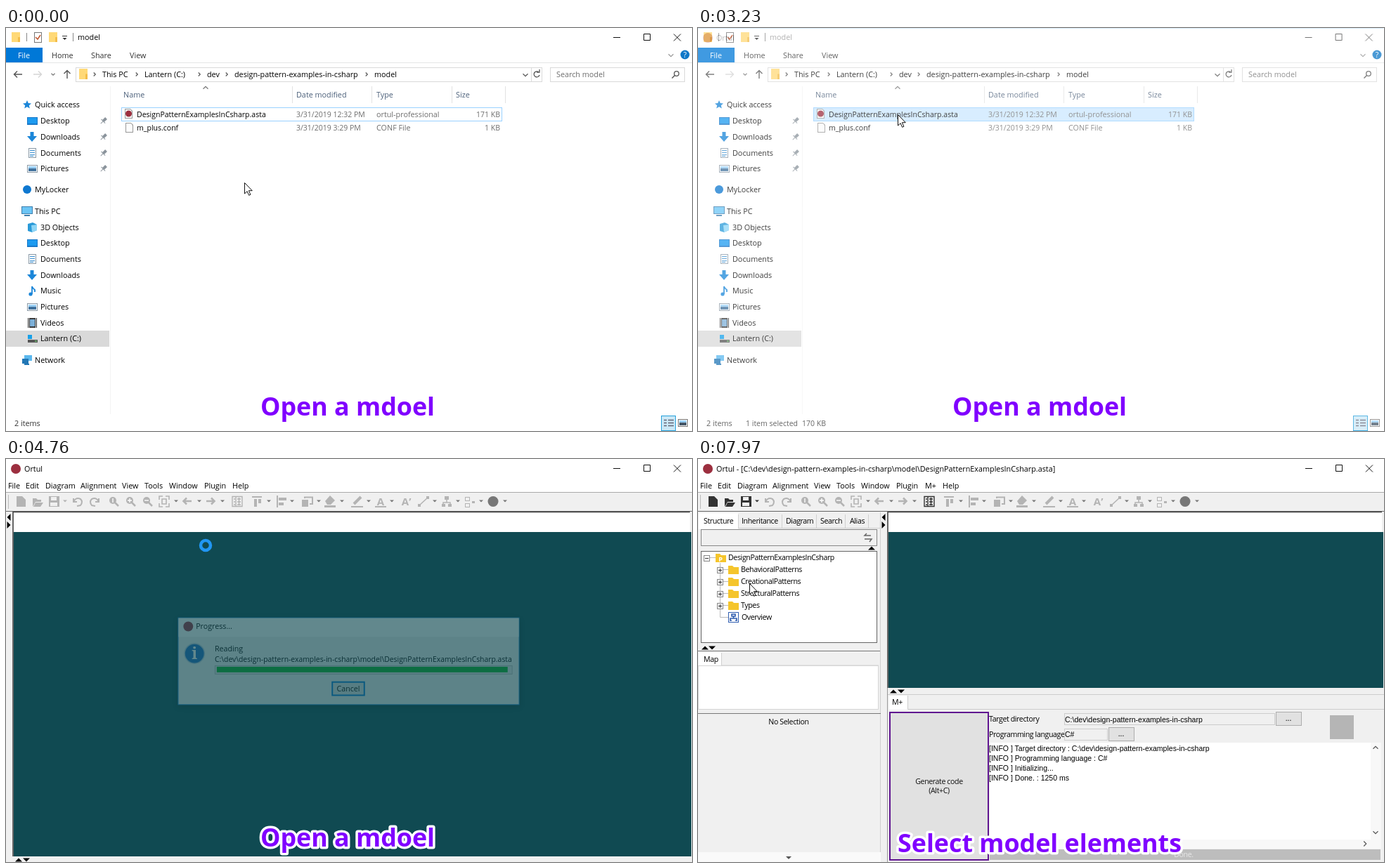
Animation, 976 px wide and 574 px high, one loop 8000 ms. Source, as an HTML page:

```html
<!DOCTYPE html>
<html lang="en">
<head>
<meta charset="utf-8">
<title>Open a model</title>
<style>
html, body { margin: 0; width: 100%; height: 100%; overflow: hidden; background: #fff; }
svg { display: block; width: 976px; height: 574px; }
text { font: 10.8px "Open Sans", "Noto Sans", sans-serif; white-space: pre; }
.tight { font-size: 10.5px; }
.tree { font-size: 10.6px; letter-spacing: -.38px; }
.log { font: 10.53px "Liberation Sans", Arial, sans-serif; }
.cap { font: bold 35.8px "Open Sans", "Noto Sans", sans-serif; fill: #8000ff; stroke: #fff;
  stroke-width: 7px; stroke-linejoin: round; paint-order: stroke; }
#dialog { transform-origin: 487px 288px; filter: drop-shadow(0 3px 5px rgba(0,0,0,.3)); }
#app { transform-origin: 0 0; }
</style>
</head>
<body>
<svg id="stage" viewBox="0 0 976 574"></svg>
<script>
const LOOP = 8000, TEAL = '#104a52', PANEL = '#f0f0f0', BLUE = '#1b86d8', MARK = '#9c2f3f';
const FILE = 'DesignPatternExamplesInCsharp', DIR = 'C:\\dev\\design-pattern-examples-in-csharp';
const PATH = `${DIR}\\model\\${FILE}.asta`, APP = 'Ortul', DRIVE = 'Lantern (C:)';

// Drawing helpers; text is placed by its visual middle.
const text = (x, cy, s, fill = '#000', cls = '', anchor = 'start', id = '') =>
  `<text x="${x}" y="${cy + 4}" fill="${fill}" class="${cls}" text-anchor="${anchor}" ${id && `id="${id}"`}>${s}</text>`;
const rect = (x, y, w, h, fill, stroke = 'none', sw = 1) =>
  `<rect x="${x}" y="${y}" width="${w}" height="${h}" fill="${fill}" stroke="${stroke}" stroke-width="${sw}"/>`;
const box = (x, y, w, h, fill, stroke) => rect(x + .5, y + .5, w - 1, h - 1, fill, stroke);
const line = (d, stroke, sw = 1) => `<path d="${d}" fill="none" stroke="${stroke}" stroke-width="${sw}"/>`;
const shape = (d, fill) => `<path d="${d}" fill="${fill}"/>`;
const dot = (x, y, r, fill) => `<circle cx="${x}" cy="${y}" r="${r}" fill="${fill}"/>`;
const group = (id, s) => `<g id="${id}">${s}</g>`;
const at = (x, y, s) => `<g transform="translate(${x} ${y})">${s}</g>`;
const turn = { r: 0, d: 90, l: 180, u: 270 };
const chev = (x, y, dir, c = '#666', s = 3) =>
  `<path d="M${-s / 2} ${-s}L${s / 2} 0L${-s / 2} ${s}" transform="translate(${x} ${y}) rotate(${turn[dir]})" fill="none" stroke="${c}" stroke-width="1.2"/>`;
const tri = (x, y, dir, s = 5, c = '#000') =>
  `<path d="M${-s / 2} ${-s}L${s / 2} 0L${-s / 2} ${s}z" transform="translate(${x} ${y}) rotate(${turn[dir]})" fill="${c}"/>`;
const arrow = (x, y, dir, c, sw = 1.4) =>
  `<path d="M-6 0H5M1 -4.5L5.5 0L1 4.5" transform="translate(${x} ${y}) rotate(${turn[dir]})" fill="none" stroke="${c}" stroke-width="${sw}"/>`;
const folder = (x, y, w = 12, h = 14) => rect(x, y, w, h, '#ffd977') + rect(x + w - 3, y + h / 2, 3, h / 2, '#f3bd4a');
const winButtons = id => `<g id="${id}" stroke="#111" fill="none"><path d="M864 13.5H874M907.5 8.5H916.5V17.5H907.5zM950 8.5L960 18.5M960 8.5L950 18.5"/></g>`;

// Small icons centred on the origin.
const icons = {
  star: shape('M0 -6L1.8 -2 6 -1.6 2.8 1.2 3.8 5.6 0 3.2 -3.8 5.6 -2.8 1.2 -6 -1.6 -1.8 -2z', BLUE),
  screen: rect(-7, -5, 15, 11, '#1a78c8') + rect(-6, -4, 13, 8, '#1d9bf0'),
  down: shape('M-2.5 -7H2.5V-1H7L0 7L-7 -1H-2.5z', BLUE),
  doc: box(-5, -7, 11, 14, '#fff', '#8a99a6') + line('M-3 -3.5H4M-3 -.5H4M-3 2.5H4M-3 4.5H2', '#3b8fd0'),
  picture: box(-7, -5, 15, 11, '#fff', '#8a99a6') + rect(-5, -3, 11, 3, '#9ad0f5') + rect(-5, 0, 11, 4, '#41719c'),
  cloud: dot(0, 0, 6, '#0f78d0'),
  pc: rect(-8, -7, 16, 11, '#3e7fae') + rect(-7, -6, 14, 9, '#6cc5f5') + rect(-4, 5, 8, 2, '#3e7fae'),
  cube: shape('M-6 -5L1 -7 7 -4V4L0 7 -6 5z', '#2a9ad8') + shape('M-1 -3L7 -4V4L0 7z', '#8fd6f6'),
  note: line('M0 5V-6Q1 -3 4 -1V2', BLUE, 1.8) + dot(-2, 5, 2.6, BLUE),
  film: rect(-6, -7, 13, 14, '#3c3c3c') + rect(-3, -5, 7, 10, '#7db0d8') + line('M-4.5 -7V7M5.5 -7V7', '#ddd'),
  drive: rect(-6, 2, 14, 4, '#555') + rect(-6, -5, 6, 6, '#18a0e8') + rect(4, 3.5, 3, 1, '#7df07d'),
  net: rect(-4, -7, 11, 8, '#5cb8ee') + rect(-7, -2, 9, 7, '#2277b5') + rect(-4, 5, 7, 2, '#2277b5')
};
const side = [
  [30, 109, 'star', 'Quick access'], [37, 132, 'screen', 'Desktop', 1], [37, 155, 'down', 'Downloads', 1],
  [37, 178, 'doc', 'Documents', 1], [37, 200, 'picture', 'Pictures', 1], [30, 230, 'cloud', 'MyLocker'],
  [30, 261, 'pc', 'This PC'], [37, 284, 'cube', '3D Objects'], [37, 306, 'screen', 'Desktop'],
  [37, 329, 'doc', 'Documents'], [37, 352, 'down', 'Downloads'], [37, 374, 'note', 'Music'],
  [37, 397, 'picture', 'Pictures'], [37, 420, 'film', 'Videos'], [37, 442, 'drive', DRIVE], [30, 473, 'net', 'Network']
];

function explorer() {
  const pin = y => `<g transform="translate(139 ${y}) rotate(45)">${rect(-2, -5, 4, 6, '#8b949c') + line('M-4 1H4M0 1V6', '#8b949c')}</g>`;
  const file = (y, name, date, type, size) => text(186, y, name, '#000', 'tight') +
    text(413, y, date, '#6d6d6d', 'tight') + text(527, y, type, '#6d6d6d') + text(703, y, size, '#6d6d6d', 'tight', 'end');
  const page = (x, y) => shape(`M${x} ${y}h8l3 3v11h-11z`, '#999') + shape(`M${x + 1} ${y + 1}h7l2 3v9h-9z`, '#fcfcfc');
  return rect(0, 0, 976, 574, '#fff') +
    folder(8, 6) + folder(61, 6) + line('M29.5 7V19M95.5 7V19', '#888') + box(40, 6, 11, 15, '#fff', '#777') +
    line('M42 13L45 16L49 10', '#c0562f', 1.5) + line('M80 11.5H87', '#333') + tri(83.5, 15.5, 'd', 3, '#333') +
    text(102, 13, 'model', '#000', '', 'start', 'exTitle') + winButtons('exButtons') +
    rect(0, 28, 52, 21, '#0078d7') + text(17, 39, 'File', '#fff') + text(65, 39, 'Home', '#333') +
    text(121, 39, 'Share', '#333') + text(176, 39, 'View', '#333') + line('M0 49.5H976', '#e4e5e6') +
    chev(946, 39, 'd', '#999', 3.5) + dot(966, 38, 6.5, '#0f78c8') + text(966, 38, '?', '#fff', '', 'middle') +
    arrow(17, 66, 'l', '#555') + arrow(45, 66, 'r', '#d5d5d5') + chev(67, 66, 'd', '#777', 2.5) + arrow(87, 66, 'u', '#555') +
    box(99, 56, 664, 21, '#fff', '#d9d9d9') + folder(104, 58, 12, 15) + line('M747.5 57V76', '#d9d9d9') +
    [126, 186, 275, 314, 513].map(x => chev(x, 66, 'r', '#555', 2.5)).join('') +
    [[137, 'This PC'], [197, DRIVE], [286, 'dev'], [325, 'design-pattern-examples-in-csharp'], [524, 'model']]
      .map(([x, s]) => text(x, 66, s)).join('') +
    chev(739, 67, 'd', '#555', 3.5) + line('M758 63A4 4 0 1 0 759 67M755 63H759V59', '#555', 1.3) +
    box(774, 56, 192, 21, '#fff', '#d9d9d9') + text(783, 66, 'Search model', '#6d6d6d') +
    `<circle cx="954" cy="65" r="3.3" fill="none" stroke="#555" stroke-width="1.3"/>` + line('M951.5 67.5L947.5 71.5', '#555', 1.5) +
    rect(0, 431, 147, 23, '#d9d9d9') + line('M148.5 83V550', '#f4f4f4') +
    side.map(([x, y, icon, s, pinned]) => at(x, y, icons[icon]) + text(x < 35 ? 41 : 49, y, s) + (pinned ? pin(y) : '')).join('') +
    [[167, 'Name'], [413, 'Date modified'], [527, 'Type'], [640, 'Size']].map(([x, s]) => text(x, 95, s, '#4c607a')).join('') +
    line('M407.5 83V107M520.5 83V107M634.5 83V107M710.5 83V107', '#e2e2e2') + chev(284, 85, 'u', '#777', 3.5) +
    `<rect id="row" x="164.5" y="113.5" width="541" height="19" stroke="#99d1ff"/>` +
    page(169, 115) + dot(174.5, 122, 4.5, MARK) + page(170, 135) +
    file(123, FILE + '.asta', '3/31/2019 12:32 PM', 'ortul-professional', '171 KB') +
    file(142, 'm_plus.conf', '3/31/2019 3:29 PM', 'CONF File', '1 KB') +
    text(12, 563, '2 items', '#333') + group('picked', text(68, 563, '1 item selected', '#333', 'tight') + text(148, 563, '170 KB', '#333', 'tight')) +
    box(932, 552, 21, 22, '#cbe8f6', '#26a0da') +
    line('M936 558.5H940M936 562.5H940M936 566.5H940M942 558.5H950M942 562.5H950M942 566.5H950', '#667', 1.4) +
    box(956, 557, 14, 11, '#fff', '#777') + rect(958, 559, 10, 3, '#9ad0f5') + rect(958, 562, 10, 4, '#456') +
    group('tip', box(290, 155, 186, 36, '#fff', '#999') + text(295, 165, 'Size: 170 KB', '#575757', 'tight') +
      text(295, 180, 'Date modified: 3/31/2019 12:32 PM', '#575757', 'tight'));
}

function toolbar() {
  const g = '#b4b4b4', lens = (x, s) => dot(x - 1, 59, 5, g) + line(`M${x + 2} 62L${x + 7} 67`, g, 2.5) + line(s, '#fff', 1.4);
  const big = (x, s) => `<text x="${x}" y="66" text-anchor="middle" fill="${g}" style="font-size:15px;font-weight:bold">${s}</text>`;
  return rect(0, 47, 976, 527, PANEL) + line('M0 47.5H976', '#aaa') + line('M3.5 51V71', '#bbb') +
    `<g class="live">${shape('M15 53H23L28 58V68H15z', 'currentColor')}${shape('M38 56H43L45 58H50V61H42L38 68zM42 62H53L49 68H39z', 'currentColor')}
      ${shape('M61 53H76V68H61z', 'currentColor')}${rect(64, 54, 8, 5, PANEL)}${rect(63, 62, 10, 5, PANEL)}</g>` +
    line('M96 56V61H101M96.5 60Q100 54 106 57Q110 61 106 66L101 67M132 56V61H127M131.5 60Q128 54 122 57Q118 61 122 66L127 67', g, 2) +
    lens(153, 'M152 56V62') + lens(177, 'M173 59H179M176 56V62') + lens(201, 'M197 59H203') +
    line('M218 58V53H223M227 53H232V58M232 63V68H227M223 68H218V63M222 57H228V64H222z', g, 1.6) +
    arrow(258, 60, 'l', g, 2.6) + arrow(291, 60, 'r', g, 2.6) +
    `<g class="live">${line('M322 53.5H336V67.5H322zM327 53V68M324 57H326M324 61H326M324 65H326M329 57H334M329 61H334M329 65H334M331.5 55V66', 'currentColor', 1.4)}</g>` +
    line('M350 54H364', g, 2) + rect(353, 57, 4, 11, g) + rect(359, 57, 4, 6, g) +
    line('M386 52V69', g, 2) + rect(388, 55, 11, 4, g) + rect(388, 62, 7, 4, g) +
    rect(421, 58, 9, 10, g) + line('M425 56V54.5H436V64H432', g, 2) +
    shape('M454 60L461 52L468 59L462 65H457z', g) + rect(453, 66, 16, 3, g) +
    line('M495 64L505 54', g, 4) + rect(491, 67, 17, 2, g) + big(533, 'A') + rect(525, 67, 16, 2, g) + big(568, 'A') + big(575, '’') +
    line('M588 66L600 55', g, 1.6) + rect(586, 64, 4, 4, g) + rect(598, 53, 4, 4, g) +
    rect(624, 53, 6, 5, g) + line('M627 58V62M622 66V62H632V66', g, 1.5) + rect(620, 64, 5, 4, g) + rect(629, 64, 5, 4, g) +
    box(653, 54, 7, 6, PANEL, g) + box(653, 63, 7, 6, PANEL, g) + rect(663, 60, 4, 3, g) + dot(693, 60.5, 7.5, '#777') +
    `<g class="live">${tri(84, 60, 'd', 3, 'currentColor')}</g>` +
    [242, 275, 308, 374, 407, 445, 478, 516, 549, 610, 643, 676, 710].map(x => tri(x, 60, 'd', 3, '#777')).join('') +
    line('M0 74.5H976', '#666');
}

// Canvas area with its collapse handles.
const canvas = (x, bottom) => rect(x, 75, 973 - x, 29, '#fff') + rect(x + 1, 104, 974 - x, bottom - 104, TEAL) +
  line(`M${x} ${bottom}V75.5H973`, '#444', 1.6) + tri(x - 6, 83, 'l') + tri(x - 6, 94, 'r') +
  tri(x + 8, bottom + 5, 'u') + tri(x + 19, bottom + 5, 'd');

function loaded() {
  const yellow = '#f5c52c', tree = (x, y, s) => text(x, y, s, '#000', 'tree');
  const expander = (x, y, plus) => box(x - 4, y - 4, 9, 9, '#fff', '#888') + line(`M${x - 2} ${y + .5}H${x + 3}${plus ? `M${x + .5} ${y - 2}V${y + 3}` : ''}`, '#333');
  const dir = (x, y) => shape(`M${x} ${y - 6}h6l2 2h7v10h-15z`, yellow);
  const dots = (x, y) => box(x, y, 37, 20, '#e1e1e1', '#adadad') + text(x + 18, y + 9, '...', '#000', '', 'middle');
  return rect(0, 75, 976, 499, PANEL) + canvas(270, 326) + line('M269.5 326V574', '#999') +
    rect(1, 77, 56, 23, '#fff') + line('M57.5 79V98M119.5 79V98M168.5 79V98M209.5 79V98M242.5 79V98M57 98.5H259M259.5 76V560', '#d0d0d0') +
    [[8, 'Structure'], [62, 'Inheritance'], [125, 'Diagram'], [174, 'Search'], [216, 'Alias']].map(([x, s]) => tree(x, 88, s)).join('') +
    box(4, 100, 251, 24, PANEL, '#888') + line('M246 109H237L240 106M237 114H247L244 118', '#666', 1.5) + tri(247, 127, 'u') +
    box(4, 131, 251, 131, '#fff', '#666') + line('M17 140.5H26M31.5 148V225.5H43M36 157.5H43M36 174.5H43M36 191.5H43M36 208.5H43', '#bbb') +
    expander(12, 141) + dir(25, 141) + `<text x="32" y="146" fill="#fff" text-anchor="middle" style="font-size:9px;font-weight:bold">P</text>` + tree(43, 140, FILE) +
    ['BehavioralPatterns', 'CreationalPatterns', 'StructuralPatterns', 'Types'].map((s, i) =>
      expander(31, 158 + 17 * i, 1) + dir(43, 158 + 17 * i) + tree(61, 157 + 17 * i, s)).join('') +
    box(43, 218, 15, 15, '#fff', '#2f5db0') + line('M48 221H53V224H48zM50.5 224V227M46 230V227H55V230M45 230H48M53 230H56', '#2f5db0', 1.6) + tree(62, 225, 'Overview') +
    tri(10, 269, 'u') + tri(20, 269, 'd') + rect(1, 275, 32, 20, '#fff') + tree(8, 285, 'Map') + line('M33.5 276V294H257', '#d0d0d0') +
    box(0, 294, 257, 63, '#fff', '#d5d5d5') + line('M0 273.5H259M0 362.5H260', '#777') + text(129, 374, 'No Selection', '#000', 'tree', 'middle') +
    rect(0, 560, 260, 14, '#fafafa') + tri(129, 568, 'd', 4, '#555') +
    rect(272, 337, 26, 20, '#fff') + tree(276, 346, 'M+') + line('M270 335.5H976M298.5 337V356.5H976', '#ccc') +
    rect(273, 361, 140, 210, '#e1e1e1', '#5f1590', 2) + text(343, 459, 'Generate code', '#111', 'tree', 'middle') + text(343, 472, '(Alt+C)', '#111', 'tree', 'middle') +
    tree(414, 370, 'Target directory') + tree(414, 392, 'Programming language') +
    box(521, 362, 300, 17, PANEL, '#ccc') + text(522, 371, DIR, '#000', 'log') + dots(822, 360) +
    box(521, 384, 62, 17, PANEL, '#ccc') + text(522, 392, 'C#', '#000', 'log') + dots(584, 382) +
    rect(899, 365, 34, 34, '#b5b5b5') +
    rect(415, 404, 542, 138, '#fff') + rect(957, 404, 15, 138, '#f8f8f8') + rect(415, 542, 557, 13, '#f8f8f8') +
    chev(964, 411, 'u', '#555', 3.5) + chev(964, 532, 'd', '#555', 3.5) + chev(949, 548, 'r', '#555', 3.5) +
    ['Target directory : ' + DIR, 'Programming language : C#', 'Initializing...', 'Done. : 1250 ms']
      .map((s, i) => group('log' + i, text(414, 412 + 14 * i, '[INFO ] ' + s, '#000', 'log'))).join('') +
    rect(415, 556, 556, 15, '#bdbdbd') + group('done', text(691, 563, 'Done.', '#e8e8e8', 'tree', 'middle'));
}

const dialog = () => box(242, 225, 491, 126, PANEL, '#1883d7') + rect(243, 226, 489, 27, '#fff') + dot(257, 238, 7, MARK) +
  text(268, 238, 'Progress...') + group('close', line('M713.5 233.5L722.5 242.5M722.5 233.5L713.5 242.5', '#222')) +
  dot(266, 277, 15, '#b9c9dc') + dot(266, 277, 13.5, '#1f6fc4') +
  `<text x="266" y="285" text-anchor="middle" fill="#fff" style="font:bold 23px 'Noto Serif',serif">i</text>` +
  text(295, 270, 'Reading') + text(295, 285, PATH, '#000', 'tight') + box(295, 294, 428, 13, '#e6e6e6', '#bcbcbc') +
  `<rect id="bar" x="298" y="296" height="8" fill="#06b025"/>` +
  rect(464, 318, 46, 19, '#e1e1e1', '#0078d7', 2) + text(487, 327, 'Cancel', '#000', '', 'middle');

const menu = [[3, 'File'], [28, 'Edit'], [56, 'Diagram'], [106, 'Alignment'], [165, 'View'], [197, 'Tools'],
  [232, 'Window'], [282, 'Plugin'], [323, 'M+', 'extra'], [322, 'Help', 'help']];
const $ = id => document.getElementById(id);
$('stage').innerHTML = group('explorer', explorer()) +
  group('app', rect(0, 0, 976, 574, '#fff') + group('edge', rect(0, 0, 976, 1, '#6fbbe8')) + dot(14, 14, 7, MARK) +
    text(26, 14, APP, '#000', '', 'start', 'appTitle') + winButtons('appButtons') +
    group('body', group('menu', menu.map(([x, s, id]) => text(x, 38, s, 'currentColor', '', 'start', id)).join('')) +
      toolbar() + group('empty', canvas(10, 566)) + group('full', loaded()))) +
  group('dialog', dialog()) + '<text id="caption" class="cap" x="486" text-anchor="middle"/>' +
  group('arrow', '<path d="M.5 .5V16L4.1 12.6L6.6 18.3L8.9 17.3L6.4 11.7H11.3z" fill="#fff" stroke="#111"/>') +
  '<circle id="ring" cy="123" fill="none" stroke="#2196f3"/>';

// Timing helpers.
const held = (table, t) => table.reduce((v, [from, next]) => t >= from ? next : v, table[0][1]);
const stepped = (t, a, b, n) => {
  const k = Math.floor((t - a) / ((b - a) / (n - 1)) + .001) + 1, p = Math.min(Math.max(k / n, 0), 1);
  return p * p * (3 - 2 * p);
};
const show = (id, on) => $(id).style.display = on ? '' : 'none';
const moves = [[500, 1270, 11, 305, 165], [1360, 1910, 8, 284, 123], [6780, 7310, 8, 201, 146], [7400, 7970, 8, 73, 177]];
const appFade = [[0, 0], [3230, .25], [3300, .5], [3380, .8], [3460, .955], [3530, 1]];
const dialogFade = [[0, 0], [3920, .25], [3990, .59], [4070, .85], [4150, 1], [4610, .85], [4690, .6], [4760, .34], [4850, 0]];
const dialogScale = [[0, .96], [3990, 1], [4690, .995], [4760, .99]];
const barWidth = [[0, 0], [3990, 28], [4070, 80], [4150, 150], [4220, 220], [4300, 290], [4530, 418]];
const ringAt = [[0, 0], [2440, 284], [2510, 297], [2760, 0], [4690, 284], [5080, 0]];

function draw(t) {
  let x = 339, y = 220;
  for (const [a, b, n, nx, ny] of moves) {
    const p = stepped(t, a, b, n);
    x += (nx - x) * p;
    y += (ny - y) * p;
  }
  $('arrow').setAttribute('transform', `translate(${Math.round(x)} ${Math.round(y)})`);
  const ringX = held(ringAt, t), small = ringX === 297;
  show('arrow', ringX !== 284);
  show('ring', ringX);
  $('ring').setAttribute('cx', ringX);
  $('ring').setAttribute('r', small ? 5.5 : 7);
  $('ring').setAttribute('stroke-width', small ? 3 : 4.5);

  $('row').setAttribute('fill', t >= 2130 ? '#cce8ff' : t >= 1750 ? '#e5f3ff' : '#fff');
  show('picked', t >= 2130);
  show('tip', t >= 1980 && t < 2130);
  const away = t >= 2760;
  $('exTitle').setAttribute('fill', away ? '#999' : '#000');
  $('exButtons').setAttribute('stroke', away ? '#999' : '#111');

  const fade = held(appFade, t), open = t >= 5080, idle = t >= 3920 && t < 4690;
  show('app', fade);
  $('app').style.opacity = fade;
  $('app').style.transform = fade < 1 ? 'scale(.999)' : '';
  show('edge', fade < 1);
  show('body', fade === 1);
  show('empty', !open);
  show('full', open);
  $('appTitle').textContent = open ? `${APP} - [${PATH}]` : APP;
  $('appTitle').setAttribute('fill', idle ? '#777' : '#000');
  $('appButtons').setAttribute('stroke', idle ? '#888' : '#111');
  $('menu').style.color = idle ? '#444' : '#000';
  show('extra', t >= 5230);
  $('help').setAttribute('x', t >= 5230 ? 348 : 322);
  document.querySelectorAll('.live').forEach(e => e.style.color = open ? '#333' : '#b4b4b4');
  [5710, 5790, 5870, 6490].forEach((from, i) => show('log' + i, t >= from));
  show('done', t >= 6490);

  const glow = held(dialogFade, t);
  show('dialog', glow);
  $('dialog').style.opacity = glow;
  $('dialog').style.transform = `scale(${held(dialogScale, t)})`;
  $('bar').setAttribute('width', held(barWidth, t));
  show('close', t < 4610);

  const second = t >= 6780;
  $('caption').textContent = second ? 'Select model elements' : 'Open a mdoel';
  $('caption').setAttribute('y', second ? 560 : 552);
}

const start = performance.now();
(function tick() {
  draw((performance.now() - start) % LOOP);
  requestAnimationFrame(tick);
})();
</script>
</body>
</html>
```
